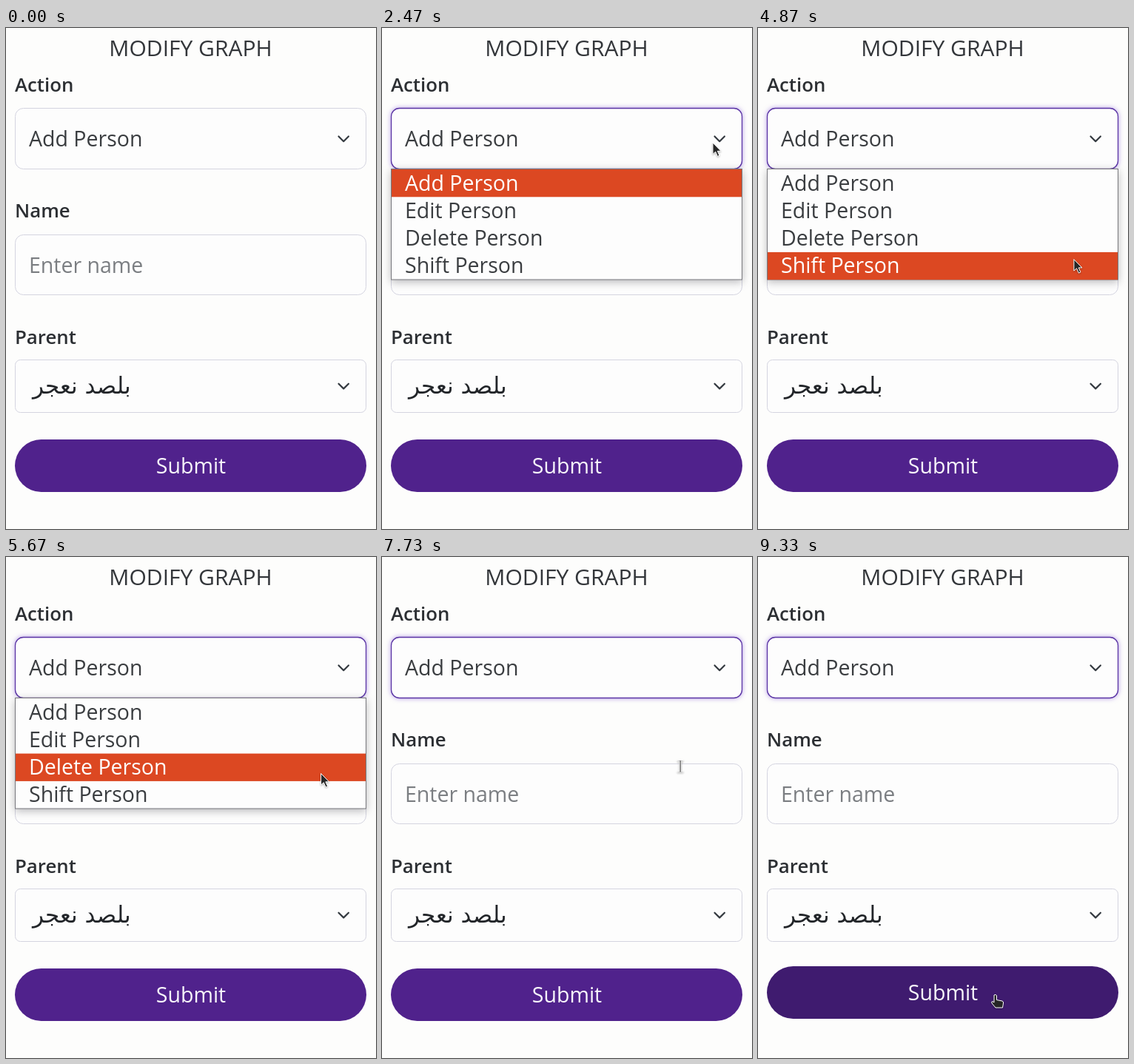
Animation of 500x677 px, one loop 9670 ms. Source, as an HTML page:

```html
<!DOCTYPE html>
<html lang="en">
<head>
<meta charset="utf-8">
<title>Modify graph</title>
<style>
  html, body { margin: 0; width: 100%; height: 100%; overflow: hidden; background: #fdfdfc; }
  svg { display: block; width: 100vw; height: 100vh; }
  text { font: 400 28.5px "Open Sans", "Noto Sans", sans-serif; fill: #3a3d40; }
  .title { font-size: 30px; text-anchor: middle; fill: #33363a; }
  .label { font-size: 25.8px; font-weight: 600; fill: #2c2f33; }
  .hint { fill: #7b7e82; }
  .parent { font: 400 31px "DejaVu Sans", sans-serif; fill: #222529; }
  .button { text-anchor: middle; fill: #f8f6fb; }
  .field { fill: #fdfdfd; stroke: #d4d4e0; }
  .focus { fill: #fdfdfd; stroke: #5b35a5; stroke-width: 1.3; filter: drop-shadow(0 0 3px rgba(110, 60, 210, .5)); }
  .popup { fill: #fdfdfd; stroke: #77777c; filter: drop-shadow(0 3px 6px rgba(60, 60, 70, .35)); }
  .chevron { fill: none; stroke: #343a40; stroke-width: 2.2; stroke-linecap: round; stroke-linejoin: round; }
  .pointer { fill: #262626; stroke: #fff; filter: drop-shadow(0 1px 1px rgba(0, 0, 0, .3)); }
</style>
</head>
<body>
<svg viewBox="0 0 500 677">
  <text class="title" x="249.5" y="38">MODIFY GRAPH</text>

  <text class="label" x="12" y="86">Action</text>
  <rect class="field" x="12.5" y="108.5" width="474" height="82" rx="11"/>
  <rect class="focus" id="focus" x="12.5" y="108.5" width="474" height="82" rx="11"/>
  <text x="31" y="160">Add Person</text>
  <path class="chevron" d="M449.5 146.5l6.7 6.7l6.7 -6.7"/>

  <text class="label" x="12" y="256">Name</text>
  <rect class="field" x="12.5" y="279.5" width="474" height="81" rx="11"/>
  <text class="hint" x="31" y="331">Enter name</text>

  <text class="label" x="12" y="427">Parent</text>
  <rect class="field" x="12.5" y="448.5" width="474" height="71" rx="7"/>
  <text class="parent" x="36" y="494">بلصد نعجر</text>
  <path class="chevron" d="M449.5 480.7l6.7 6.7l6.7 -6.7"/>

  <g id="submit">
    <rect id="pill" x="12" y="556" width="475" height="71" rx="35.5"/>
    <text class="button" x="250" y="602">Submit</text>
  </g>

  <g id="popup">
    <rect class="popup" x="12.5" y="190.5" width="474" height="149.5"/>
    <rect id="highlight" x="13" width="473" height="37.3" fill="#dc4822"/>
  </g>

  <g id="cursor">
    <path class="pointer" id="arrow" d="M0 0V15.5L3.7 12.2L6.5 18.5L9 17.3L6.3 11.3H11Z"/>
    <path class="pointer" id="beam" d="M-4 -8H4V-7H1V7H4V8H-4V7H-1V-7H-4Z"/>
    <path class="pointer" id="hand" d="M0 0Q2 -1.5 3.5 .5V6.5L11 8Q13 8.5 12.5 11L11.5 17H2L-3 11Q-4 8.5 -2 8.5L0 10Z"/>
  </g>
</svg>
<script>
const LOOP = 9670, FRAME = 1000 / 15;
const ENTER = 600, OPEN = 1870, CLOSE = 7400, HOVER = 9070;
const LIST_TOP = 191, ROW = 37.3;

// Each move starts at a time, lasts a while and ends at x, y.
const entry = [484, 240];
const moves = [
  [ENTER, 600, 418, 134],
  [1400, 130, 447, 155],
  [2470, 930, 434, 224],
  [3400, 130, 432, 241],
  [3670, 330, 426, 257],
  [4000, 130, 425, 284],
  [4400, 600, 427, 314],
  [5270, 60, 426, 305],
  [5600, 670, 424, 242],
  [6470, 200, 422, 217],
  [7600, 1130, 335, 521],
  [8930, 400, 319, 592]
];

const $ = id => document.getElementById(id);
const clamp = (v, lo, hi) => Math.min(hi, Math.max(lo, v));
const ramp = (t, start, length) => clamp((t - start) / length, 0, 1);
const easeOut = k => k * (2 - k);
const lerp = (a, b, k) => a + (b - a) * k;
const show = (id, on) => { $(id).style.display = on ? "" : "none"; };

const options = ["Add", "Edit", "Delete", "Shift"].map((verb, i) => {
  const text = document.createElementNS("http://www.w3.org/2000/svg", "text");
  text.setAttribute("x", 31);
  text.setAttribute("y", 220 + 37 * i);
  text.textContent = verb + " Person";
  return $("popup").appendChild(text);
});

const pointerAt = t => moves.reduce(([x, y], [start, length, toX, toY]) => {
  const k = easeOut(ramp(t, start, length));
  return [lerp(x, toX, k), lerp(y, toY, k)];
}, entry);

function render(time) {
  const t = Math.floor((time + 5) / FRAME) * FRAME;
  const now = Math.round(t / 10) * 10;
  const [x, y] = pointerAt(now);
  const open = now >= OPEN && now < CLOSE;

  $("focus").style.opacity = ramp(now, OPEN - FRAME, 150);

  show("popup", open);
  const active = clamp(Math.floor((y - LIST_TOP) / ROW), 0, options.length - 1);
  $("highlight").setAttribute("y", LIST_TOP + ROW * active);
  options.forEach((text, i) => { text.style.fill = i === active ? "#fff" : ""; });

  const hover = ramp(now, HOVER - FRAME, 150);
  $("submit").setAttribute("transform", `translate(0 ${-3 * hover})`);
  $("pill").setAttribute("fill", `hsl(266 61% ${lerp(34, 27, hover)}%)`);

  const overButton = now >= HOVER;
  const overInput = now >= CLOSE && y > 279 && y < 361;
  show("cursor", now >= ENTER);
  show("hand", overButton);
  show("beam", overInput);
  show("arrow", !overButton && !overInput);
  $("cursor").setAttribute("transform", `translate(${x.toFixed(1)} ${y.toFixed(1)})`);
}

const start = performance.now();
function tick() {
  render((performance.now() - start) % LOOP);
  requestAnimationFrame(tick);
}
tick();
</script>
</body>
</html>
```
